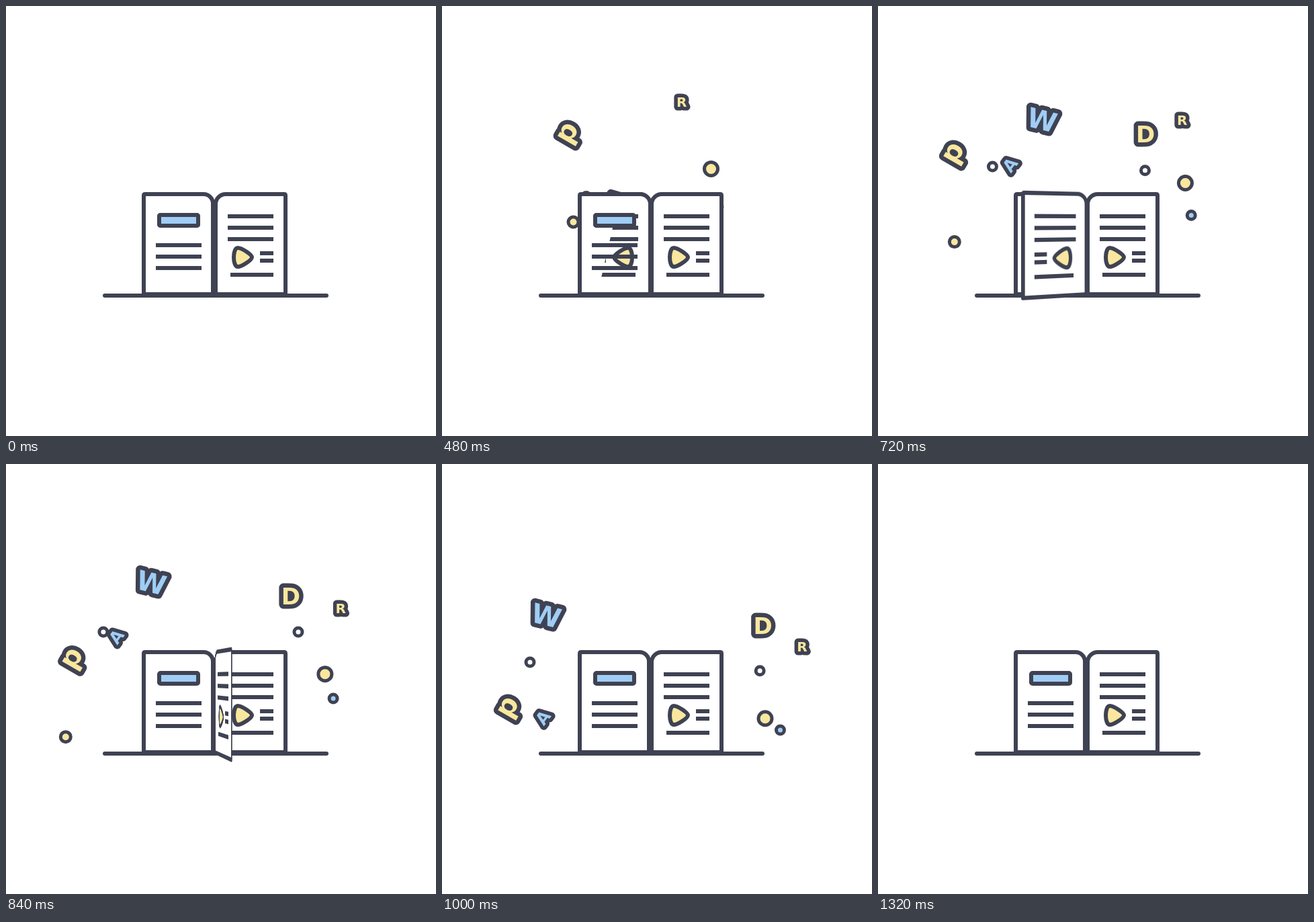
These frames come from a looping animation (640 px wide and 640 px high, 1.36 s). An HTML page:

```html
<!DOCTYPE html>
<html lang="en">
<head>
<meta charset="utf-8">
<title>Open book</title>
<style>
  html, body { margin: 0; width: 100%; height: 100%; overflow: hidden; background: #fff; }
  #stage { position: relative; width: 640px; height: 640px; overflow: hidden; perspective: 1080px; }
  svg { position: absolute; left: 0; top: 0; width: 640px; height: 640px; }
  #leaf { transform-origin: 311px 320px; }
  .ink { stroke: #3f4252; stroke-width: 6; stroke-linejoin: round; }
  text {
    font-family: "DejaVu Sans", sans-serif; font-weight: bold; text-anchor: middle;
    stroke: #3f4252; stroke-linejoin: round; paint-order: stroke;
  }
</style>
</head>
<body>
<div id="stage">
  <svg viewBox="0 0 640 640">
    <defs>
      <g id="rightPage" class="ink" fill="#fff">
        <path d="M312 429V295a15 15 0 0 1 15-15H414q2 0 2 2V429Z"/>
        <path d="M330 313H398M330 330H398M330 347H398M378 368H398M378 379H398M334 400H398"/>
        <path fill="#f9e79f" d="M345 360C351 360 366 370 366 374S351 388 345 388C341 388 339 381 339 374S341 360 345 360Z"/>
      </g>
      <g id="leftText" class="ink" fill="#9fcdf5">
        <rect x="228" y="311" width="58" height="16" rx="2"/>
        <path d="M223 356H291M223 373H291M223 390H291"/>
      </g>
    </defs>
    <g id="parts"></g>
    <path class="ink" stroke-linecap="round" d="M147 431H477"/>
    <path class="ink" fill="#fff" d="M205 429V282q0-2 2-2H294a14 14 0 0 1 14 14V429Z"/>
    <use href="#leftText"/>
    <use href="#rightPage"/>
  </svg>
  <svg id="leaf" viewBox="0 0 640 640"><use href="#rightPage"/></svg>
  <svg id="overlay" viewBox="0 0 640 640"><use href="#leftText"/></svg>
</div>
<script>
const LOOP = 1360, STEP = 40;
const YELLOW = '#f9e79f', BLUE = '#9fcdf5', WHITE = '#fff', INK = '#3f4252';
const SPINE = 311, HIDDEN_Y = 340;
const $ = id => document.getElementById(id);
const leaf = $('leaf'), overlay = $('overlay');
const parts = [];

const clamp = u => Math.max(0, Math.min(1, u));
const ease = u => (1 - Math.cos(Math.PI * clamp(u))) / 2;

function make(tag, attrs) {
  const el = document.createElementNS('http://www.w3.org/2000/svg', tag);
  for (const key in attrs) el.setAttribute(key, attrs[key]);
  $('parts').append(el);
  return el;
}

function letter(char, size, fill, edge, angle = 0, drop = 0.364) {
  const el = make('text', { 'font-size': size, fill, 'stroke-width': edge, y: size * drop });
  el.textContent = char;
  el.dataset.angle = angle;
  return el;
}

const dot = (r, fill) => make('circle', { r, fill, stroke: INK, 'stroke-width': 5 });

// A part drifts sideways, shoots up to `top` at time `peak`, then drops to `land`.
function fly(el, path) {
  parts.push({ el, from: SPINE, start: 0, end: 960, rise: 270, fall: 560, ...path });
}

fly(dot(6, WHITE), { from: 217, to: 131, start: 420, end: 990, peak: 729, rise: 327, top: 239, land: 357 });
fly(dot(6, WHITE), { from: 330, to: 484, start: 370, end: 1130, peak: 770, rise: 193, top: 243, land: 391, fall: 500 });
fly(dot(7.5, YELLOW), { to: 80, peak: 565, rise: 125, top: 313, land: 440, fall: 420 });
fly(dot(10, YELLOW), { from: 320, to: 481, peak: 575, top: 238, land: 401 });
fly(dot(6, BLUE), { to: 506, start: -150, end: 1090, peak: 560, rise: 138, top: 289, land: 409 });
fly(letter('p', 41, YELLOW, 13, -60, 0.175), { to: 102, start: 20, end: 860, peak: 560, rise: 177, top: 176, land: 371, fall: 500 });
fly(letter('A', 25, BLUE, 11, -53), { from: 261, to: 150, start: 410, end: 970, peak: 770, rise: 370, top: 236, land: 398, fall: 300 });
fly(letter('W', 40, BLUE, 13, 14), { from: 245, to: 135, start: 695, end: 1120, peak: 757, top: 169, land: 311 });
fly(letter('D', 34, YELLOW, 13), { from: 397, to: 494, start: 690, end: 1115, peak: 757, top: 190, land: 318 });
fly(letter('R', 20, YELLOW, 11), { from: 314, to: 541, start: 240, end: 1080, peak: 560, rise: 455, top: 142, land: 288 });

function height({ peak, rise, fall, top, land }, t) {
  return t < peak
    ? top + (HIDDEN_Y - top) * clamp((peak - t) / rise) ** 3
    : top + (land - top) * ease((t - peak) / fall);
}

function drawPart(part, t) {
  const { el, from, to, start, end, peak, fall } = part;
  const x = from + (to - from) * ease((t - start) / (end - start));
  const scale = clamp((peak + fall - t) / 40);
  el.style.display = scale ? '' : 'none';
  el.setAttribute('transform',
    `translate(${x} ${height(part, t)}) rotate(${el.dataset.angle || 0}) scale(${scale})`);
}

function drawLeaf(t) {
  const turning = t >= 600;
  leaf.style.display = t > 0 && t < 1000 ? '' : 'none';
  overlay.style.display = turning ? 'none' : '';
  const angle = turning ? 180 * (1 - ease((t - 600) / 440)) : 180;
  leaf.style.transform = `rotateY(${-angle}deg)`;
  // While still flat, the leaf surfaces outwards from the spine.
  const k = (t / 480) ** 4;
  const edge = y => SPINE + k * (57 + 0.229 * (y - 330));
  leaf.style.clipPath = turning ? 'none'
    : `polygon(0 0, ${edge(0)}px 0, ${edge(640)}px 640px, 0 640px)`;
}

function draw(now) {
  const t = Math.floor((now % LOOP) / STEP) * STEP;
  parts.forEach(part => drawPart(part, t));
  drawLeaf(t);
}

const begin = performance.now();
function tick() {
  draw(performance.now() - begin);
  requestAnimationFrame(tick);
}
tick();
</script>
</body>
</html>
```
